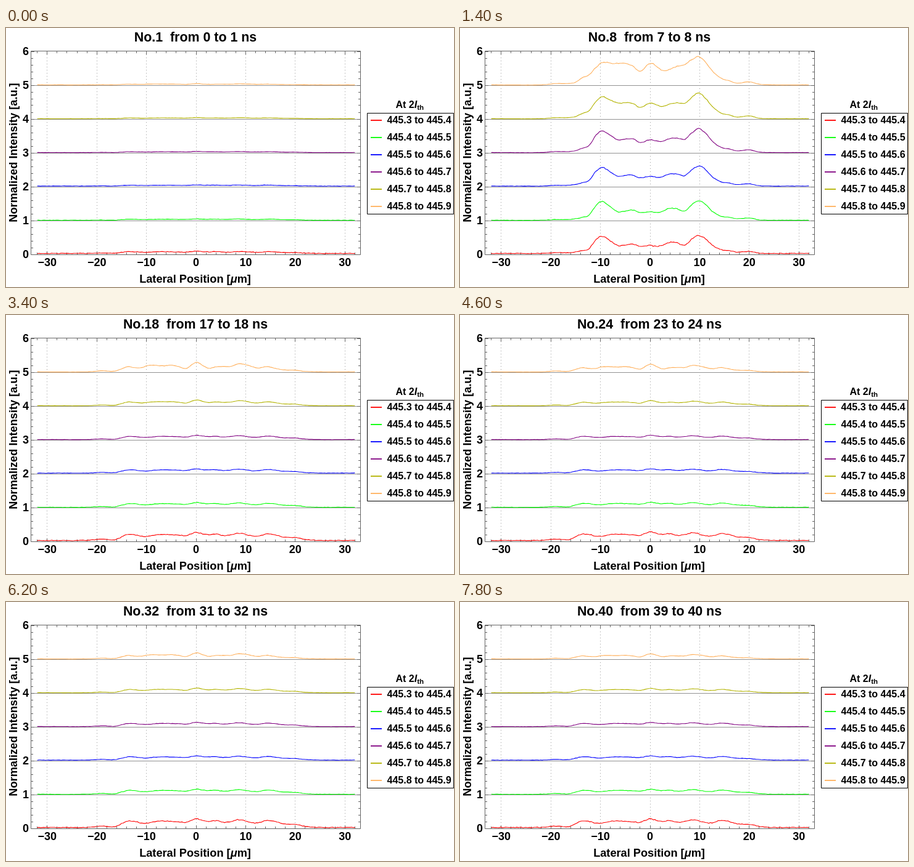
Write an HTML page that moves like this. It is 726 px wide and 421 px high and loops after 8000 ms.

```html
<!DOCTYPE html>
<html lang="en">
<head>
<meta charset="utf-8">
<title>Lateral intensity over time</title>
<style>
html, body { margin: 0; width: 100%; height: 100%; overflow: hidden; background: #fff; }
svg { display: block; width: 726px; height: 421px; }
text { font: bold 18px "Liberation Sans", Arial, sans-serif; white-space: pre; }
</style>
</head>
<body>
<svg id="plot" viewBox="0 0 726 421"></svg>
<script>
const svg = document.getElementById('plot');
const STEP = 200, COUNT = 40;
const COLORS = ['#f00', '#0f0', '#00f', '#800080', '#b3b300', '#ffb05c'];
const px = x => 308 + 8.04 * x;
const py = y => 368 - 55 * y;

function add(tag, attrs, text = '', parent = svg) {
  const el = document.createElementNS('http://www.w3.org/2000/svg', tag);
  for (const k in attrs) el.setAttribute(k, attrs[k]);
  el.textContent = text;
  parent.appendChild(el);
  return el;
}
const path = (d, stroke, extra) => add('path', { d, stroke, fill: 'none', 'stroke-width': 1, ...extra });
const label = (x, y, size, text, anchor = 'middle', extra) =>
  add('text', { x, y, 'text-anchor': anchor, style: `font-size:${size}px`, ...extra }, text);
const half = v => Math.floor(v) + 0.5;

function drawAxes() {
  let grid = '', lines = '', ticks = '';
  for (let x = -32; x <= 32; x += 2) {
    const major = x % 10 === 0, n = major ? 5 : 3, X = half(px(x));
    ticks += `M${X} 368v${-n}M${X} 38v${n}`;
    if (!major) continue;
    grid += `M${X} 38V368`;
    label(px(x), 387, 18, String(x).replace('-', '\u2212'));
  }
  for (let i = 0; i <= 30; i++) {
    const major = i % 5 === 0, n = major ? 5 : 3, Y = half(py(i / 5));
    ticks += `M41 ${Y}h${n}M574 ${Y}h${-n}`;
    if (!major) continue;
    if (i && i < 30) lines += `M41 ${Y}H574`;
    label(37, py(i / 5) + 6, 18, i / 5, 'end');
  }
  path(grid, '#999', { 'stroke-dasharray': '1 4' });
  path(lines, '#929292');
  path(ticks, '#666');
  path('M40.5 37.5H574.5V368.5H40.5Z', '#666');

  const name = label(306.5, 414, 18.2, 'Lateral Position [');
  add('tspan', { 'font-style': 'italic' }, '\u03bc', name);
  add('tspan', {}, 'm]', name);
  label(0, 0, 18.2, 'Normalized Intensity [a.u.]', 'middle', { transform: 'translate(17.5 202.5) rotate(-90)' });
}

function drawLegend() {
  const head = label(631.5, 130, 16, 'At 2', 'start');
  add('tspan', { 'font-style': 'italic' }, 'I', head);
  add('tspan', { dy: 3, style: 'font-size:11.5px' }, 'th', head);
  path('M585.5 138.5H725.5V302.5H585.5Z', '#000');
  COLORS.forEach((c, i) => {
    const y = 150 + 28 * i;
    path(`M591 ${y}H609`, c, { 'stroke-width': 1.8 });
    label(617.5, y + 5, 16, `445.${3 + i} to 445.${4 + i}`, 'start');
  });
}

// Lateral profiles in hundredths, sampled at the knots.
const KNOTS = [-32, -22, -19, -16.5, -15, -13.7, -12.3, -11, -9.7, -8, -6.5, -5, -3.5, -2, 0, 1.5,
  2.5, 4, 5.5, 7, 8.5, 9.8, 11.2, 12.5, 14.3, 16, 17.5, 20, 22, 25, 32];
const PULSE_SHORT = [0, 0, 2, 2, 4, 8, 14, 39, 51, 37, 23, 25, 28, 21, 23, 21,
  24, 33, 31, 25, 43, 54, 43, 25, 11, 8, 4, 6, 1, 0, 0];
const PULSE_LONG = [0, 0, 4, 4, 8, 21, 30, 50, 66, 64, 63, 64, 56, 40, 64, 53,
  42, 46, 55, 60, 76, 84, 66, 42, 20, 12, 5, 9, 2, 0, 0];
const STEADY = [0, 0, 4, 2, 11, 19, 18, 13, 13, 18, 19, 18, 17, 15, 25, 20,
  18, 20, 15, 18, 23, 20, 14, 14, 21, 17, 11, 9, 3, 0, 0];
const LONG_TAIL = [0, 0, 3, 2, 9, 15, 11, 13, 21, 20, 18, 21, 16, 9, 30, 18,
  9, 14, 17, 16, 25, 24, 17, 11, 15, 9, 5, 4, 1, 0, 0];

const BASE = [0.03, 0.01, 0.02, 0.01, 0.01, 0.01];
const GRAIN = [0.011, 0.006, 0.006, 0.004, 0.003, 0.003];
const PULSE_MIX = [0, 0, 0.12, 0.22, 0.45, 1];
const PULSE_GAIN = [1, 1.08, 1.04, 1.18, 1.12, 1];
const STEADY_GAIN = [1, 0.6, 0.5, 0.48, 0.4, 0.2];
const TAIL_GAIN = [0, 0, 0, 0.02, 0.3, 1];

function sample(ys, x) {
  let i = 0;
  while (i < KNOTS.length - 2 && x > KNOTS[i + 1]) i++;
  const slope = j => {
    const a = Math.max(j - 1, 0), b = Math.min(j + 1, KNOTS.length - 1);
    return (ys[b] - ys[a]) / (KNOTS[b] - KNOTS[a]);
  };
  const h = KNOTS[i + 1] - KNOTS[i], u = (x - KNOTS[i]) / h, v = 1 - u;
  return (v * v * (1 + 2 * u) * ys[i] + u * u * (1 + 2 * v) * ys[i + 1]
    + h * u * v * (v * slope(i) - u * slope(i + 1))) / 100;
}

function noise(a, b, c) {
  const s = Math.sin(a * 12.9898 + b * 78.233 + c * 37.719) * 43758.5453;
  return 2 * (s - Math.floor(s)) - 1;
}

const XS = Array.from({ length: 201 }, (_, i) => -32 + 0.32 * i);
const SHAPES = XS.map(x => [PULSE_SHORT, PULSE_LONG, STEADY, LONG_TAIL].map(p => sample(p, x)));

// One trace k during nanosecond n: turn-on pulse, then settling.
function trace(k, n) {
  const late = Math.max(n - 13, 0);
  const pulse = Math.exp(-(((n - 8) / 1.9) ** 2));
  const rest = 1 - pulse, early = n < 8;
  const settle = k < 2 ? 1 - 0.25 * Math.exp(-late / 4) : 1;
  const steady = STEADY_GAIN[k] * rest * (early ? 0.26 : settle);
  const tail = TAIL_GAIN[k] * rest * (early ? 0.08 : 0.2 + 0.8 * Math.exp(-late / 15));
  return 'M' + SHAPES.map(([short, long, flat, slow], i) => {
    const peak = PULSE_GAIN[k] * (short + (long - short) * PULSE_MIX[k]);
    const y = pulse * peak + steady * flat + tail * slow;
    const grain = (noise(k, i, 0) + noise(k, i, n)) / 2 * (GRAIN[k] + 0.025 * y);
    return px(XS[i]).toFixed(1) + ' ' + py(k + BASE[k] + y + grain).toFixed(2);
  }).join('L');
}

drawAxes();
drawLegend();
const title = label(307, 22, 21.4, '');
const curves = COLORS.map(c => path('', c, { 'stroke-width': 1.1, 'stroke-linejoin': 'round' }));

let shown = 0;
function render(ms) {
  const n = Math.floor(ms / STEP) % COUNT + 1;
  if (n === shown) return;
  shown = n;
  title.textContent = `No.${n}  from ${n - 1} to ${n} ns`;
  curves.forEach((c, k) => c.setAttribute('d', trace(k, n)));
}

const start = performance.now();
function tick() {
  render(performance.now() - start);
  requestAnimationFrame(tick);
}
tick();
</script>
</body>
</html>
```
